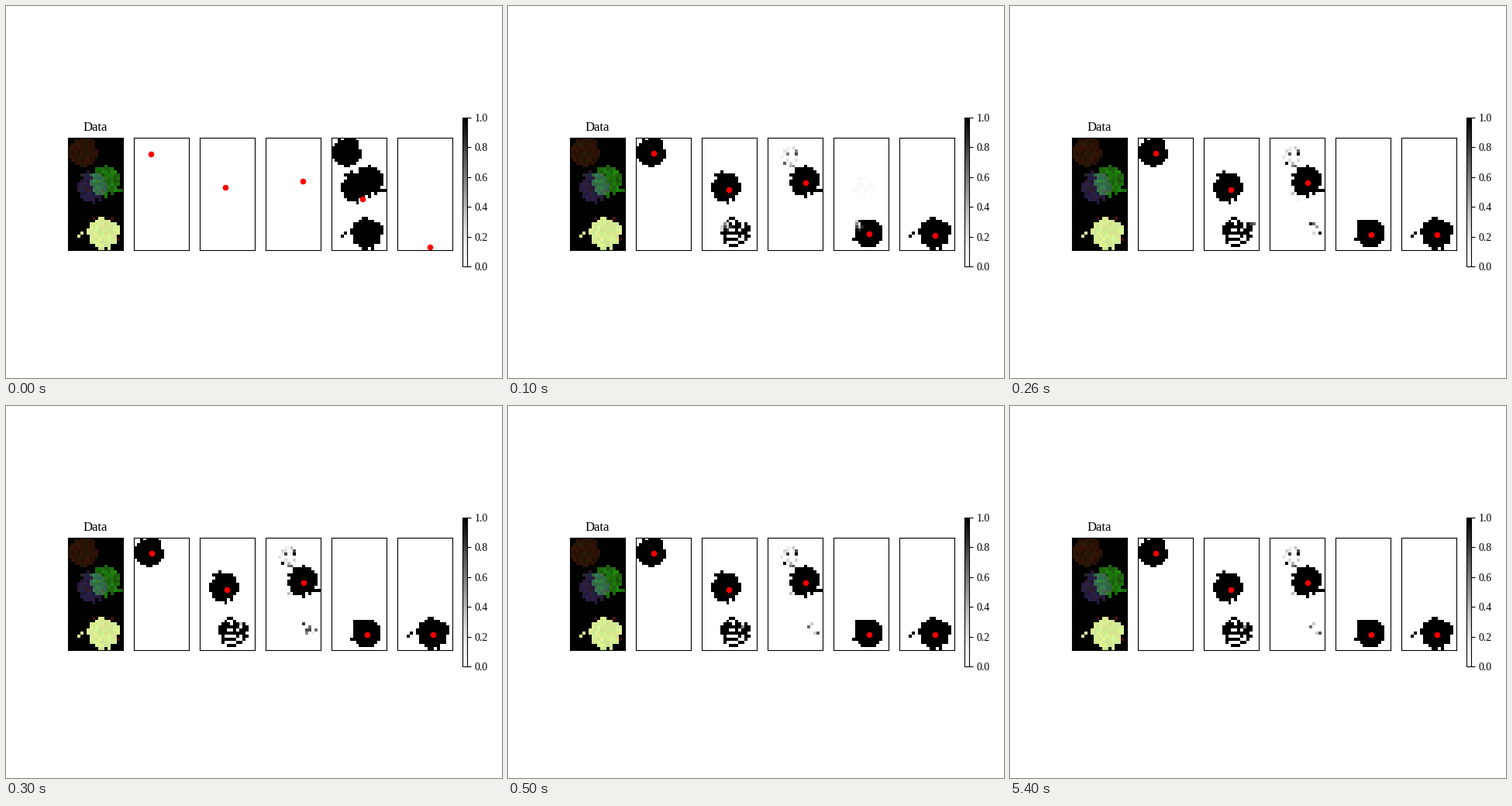
Recreate the animation shown at these times as a matplotlib script. Size 640 px wide and 480 px high, loop 8600 ms.

```python
import numpy as np
import matplotlib.pyplot as plt
from matplotlib.animation import FuncAnimation

COLS, ROWS = 18, 37
STEP_MS, LOOP_MS = 100, 8600
LAST = 4  # the fit has settled from this step on
plt.rcParams["font.family"] = "Liberation Serif"
yy, xx = np.mgrid[:ROWS, :COLS]


def distance(cx, cy):
    return np.hypot(xx - cx, yy - cy)


def blob(cx, cy, r, seed, rough=0.3):
    """Pixel disc with a ragged rim."""
    rim = np.random.default_rng(seed).normal(r, rough, (ROWS, COLS))
    return distance(cx, cy) <= rim


def speckle(cx, cy, r, share, seed, power=1.0):
    """Random grey cells inside a disc; a high power makes them pale."""
    rng = np.random.default_rng(seed)
    chosen = rng.random((ROWS, COLS)) < share
    value = rng.random((ROWS, COLS)) ** power
    return np.where(chosen & (distance(cx, cy) <= r), value, 0)


brown = blob(4.5, 4.2, 4.8, seed=1)
purple = blob(7.6, 15.9, 4.8, seed=2)
green = blob(11.7, 13.9, 4.85, seed=3)
green[17, 14:] = True
yellow = blob(11, 31, 5.2, seed=4)
yellow[31, 4] = yellow[32, 3] = True
core = blob(10.8, 30.8, 4.8, seed=5) & (yy >= 27)
sponge = speckle(10.4, 30.6, 4.9, 0.62, seed=6, power=0.05)


def data_image():
    rng = np.random.default_rng(7)
    img = rng.uniform(0, 0.012, (ROWS, COLS, 3))

    def paint(mask, rgb, spread):
        shade = rng.normal(1, spread, (ROWS, COLS, 3))
        img[mask] = (np.array(rgb) / 255 * shade)[mask]

    paint(brown, (44, 20, 5), 0.14)
    paint(purple, (41, 30, 62), 0.16)
    paint(green, (28, 108, 14), 0.12)
    paint(purple & green, (54, 110, 78), 0.1)
    rim = (distance(11, 31) < 6.2) & (rng.random((ROWS, COLS)) < 0.12)
    paint(rim, (78, 14, 22), 0.1)
    paint(yellow, (216, 236, 146), 0.035)
    return np.clip(img, 0, 1)


def panel_grids(k):
    """Membership grids of the five panels at step k."""
    g = np.zeros((5, ROWS, COLS))
    if k == 0:
        g[3] = brown | purple | green | yellow
        return g

    darkening = min(0.6 + 0.25 * k, 1.2)
    haze = speckle(7.2, 6, 3.3, 0.65, seed=8, power=1.6) * darkening
    g[:] = brown, purple | (sponge > 0), np.maximum(green, haze), core, yellow

    unsure = speckle(6.8, 28.5, 2.4, 0.8, seed=9)
    if k == 1:
        g[1] -= 0.8 * unsure * (sponge > 0)
        g[3] -= 0.8 * unsure * core
        g[3] += speckle(9.5, 16, 4, 0.8, seed=10) * 0.06
    else:
        g[1] += speckle(14.5, 28.5, 2, 0.3, seed=20 + k, power=2)
        g[2] += speckle(14, 29.5, 2.8, 0.25, seed=30 + k, power=0.7)
        spill = 0.7 if k == 2 else 0.12
        g[2] += speckle(7.5, 18, 3, spill, seed=40, power=3) * 0.4
    return np.clip(g, 0, 1)


START = np.array([(5.2, 5.06), (7.95, 15.96), (11.77, 13.93),
                  (9.7, 19.8), (10.2, 35.3)])
FINAL = np.array([(5.35, 4.78), (8.46, 16.7), (12.0, 14.4),
                  (11.24, 31.4), (11.2, 31.45)])


def centres(k):
    """Cluster centres converge almost fully in the first step."""
    return FINAL + (START - FINAL) * 0.02 ** k


fig, axes = plt.subplots(1, 6, figsize=(6.4, 4.8), dpi=100)
for ax in axes:
    ax.set_xticks([])
    ax.set_yticks([])
axes[0].imshow(data_image())
axes[0].set_title("Data", fontsize=12)

steps = [(panel_grids(k), centres(k)) for k in range(LAST + 1)]
images, dots = [], []
for ax in axes[1:]:
    images.append(ax.imshow(np.zeros((ROWS, COLS)), cmap="Greys", vmin=0, vmax=1))
    dots += ax.plot([0], [0], "o", color="red", ms=4.47, mew=1)
    ax.set_xlim(-0.5, COLS - 0.5)
    ax.set_ylim(ROWS - 0.5, -0.5)
fig.colorbar(images[0], cax=fig.add_axes([0.92, 0.3, 0.01, 0.4]))


def draw(i):
    grids, points = steps[min(i, LAST)]
    for image, dot, grid, (x, y) in zip(images, dots, grids, points):
        image.set_data(grid)
        dot.set_data([x], [y])
    return images + dots


anim = FuncAnimation(fig, draw, frames=LOOP_MS // STEP_MS, interval=STEP_MS,
                     init_func=lambda: draw(0), repeat=True, repeat_delay=0)
plt.show()
```
